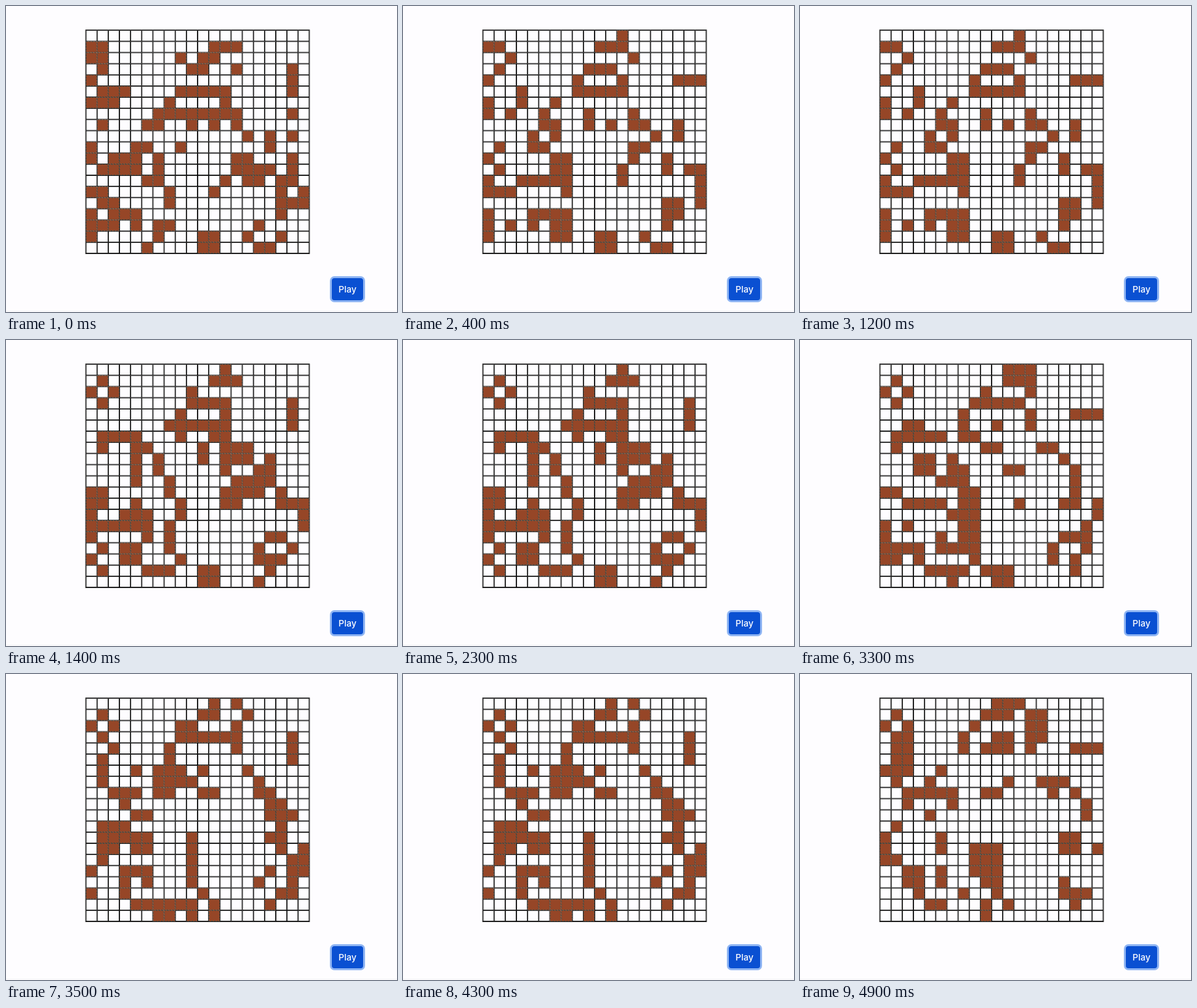
An HTML page with a canvas for the animation above (5000 ms loop, 600x470 px).

```html
<!DOCTYPE html>
<html lang="en">
<head>
<meta charset="utf-8">
<title>Game of Life</title>
<style>
  html, body { margin: 0; width: 100%; height: 100%; overflow: hidden; background: #fefdff; }
  canvas { position: absolute; left: 0; top: 0; }
  .play {
    position: absolute; left: 500px; top: 418px; width: 48px; height: 34px;
    border-radius: 4px; background: #0a50d2; color: #fff;
    box-shadow: 0 0 0 3px #8fb5f3;
    font: 500 13.6px/34px Inter, "Liberation Sans", sans-serif; text-align: center;
  }
</style>
</head>
<body>
<canvas id="board" width="600" height="470"></canvas>
<div class="play">Play</div>
<script>
const SIZE = 20, PITCH = 17.14, LEFT = 122.6, TOP = 37.2, LINE = 0.86;
const LOOP = 5000, FIRST_STEP = 400, STEP = 1000;

// Live columns of each row in the first generation, as runs.
const seed = [
  '', '0-1 11-13', '0-1 8 10-11', '1 9-10 13 18', '0 18',
  '1-3 8-12 18', '0-2 7 12', '6-13 18', '1 5-6 9 11 13', '14 16 18',
  '0 4-5 8 16', '0 2-4 6 13-14 18', '1-4 6 13-16 18', '5-6 12 14-15 17-18', '0-1 7 11 17 19',
  '1-2 7 17-19', '0 2-4 17', '0-2 4 6-7 15', '0 6 10-11 14 17', '5 10-11 15-16'
];

function parseRow(text) {
  const row = new Array(SIZE).fill(0);
  for (const run of text.split(' ').filter(Boolean)) {
    const [from, to = from] = run.split('-').map(Number);
    row.fill(1, from, to + 1);
  }
  return row;
}

function neighbours(grid, r, c) {
  let n = -grid[r][c];
  for (let y = r - 1; y <= r + 1; y++)
    for (let x = c - 1; x <= c + 1; x++)
      n += grid[y]?.[x] ?? 0;
  return n;
}

function evolve(grid) {
  return grid.map((row, r) => row.map((alive, c) => {
    const n = neighbours(grid, r, c);
    return n === 3 || (alive && n === 2) ? 1 : 0;
  }));
}

const generations = [seed.map(parseRow)];
while (generations.length < 6) generations.push(evolve(generations.at(-1)));

const ctx = document.getElementById('board').getContext('2d');

function drawCell(r, c, alive) {
  const x = LEFT + c * PITCH, y = TOP + r * PITCH, inner = PITCH - LINE;
  if (alive) {
    ctx.fillStyle = '#964627';
    ctx.fillRect(x, y, PITCH, PITCH);
  }
  ctx.strokeStyle = alive ? '#2f4f4f' : '#000';
  ctx.setLineDash(alive ? [2.6, 1.7] : []);
  ctx.strokeRect(x + LINE / 2, y + LINE / 2, inner, inner);
}

function draw(grid) {
  ctx.clearRect(0, 0, 600, 470);
  ctx.fillStyle = '#f4f4f6';
  ctx.fillRect(0, 468, 600, 1);
  ctx.lineWidth = LINE;
  grid.forEach((row, r) => row.forEach((alive, c) => drawCell(r, c, alive)));
  ctx.setLineDash([]);
  ctx.strokeStyle = '#000';
  const side = SIZE * PITCH + LINE;
  ctx.strokeRect(LEFT - LINE / 2, TOP - LINE / 2, side, side);
}

let shown = -1;
function show(ms) {
  const t = ms % LOOP;
  const gen = Math.max(0, Math.floor((t - FIRST_STEP) / STEP) + 1);
  if (gen !== shown) draw(generations[shown = gen]);
}

const start = performance.now();
function tick() {
  show(performance.now() - start);
  requestAnimationFrame(tick);
}
tick();
</script>
</body>
</html>
```
